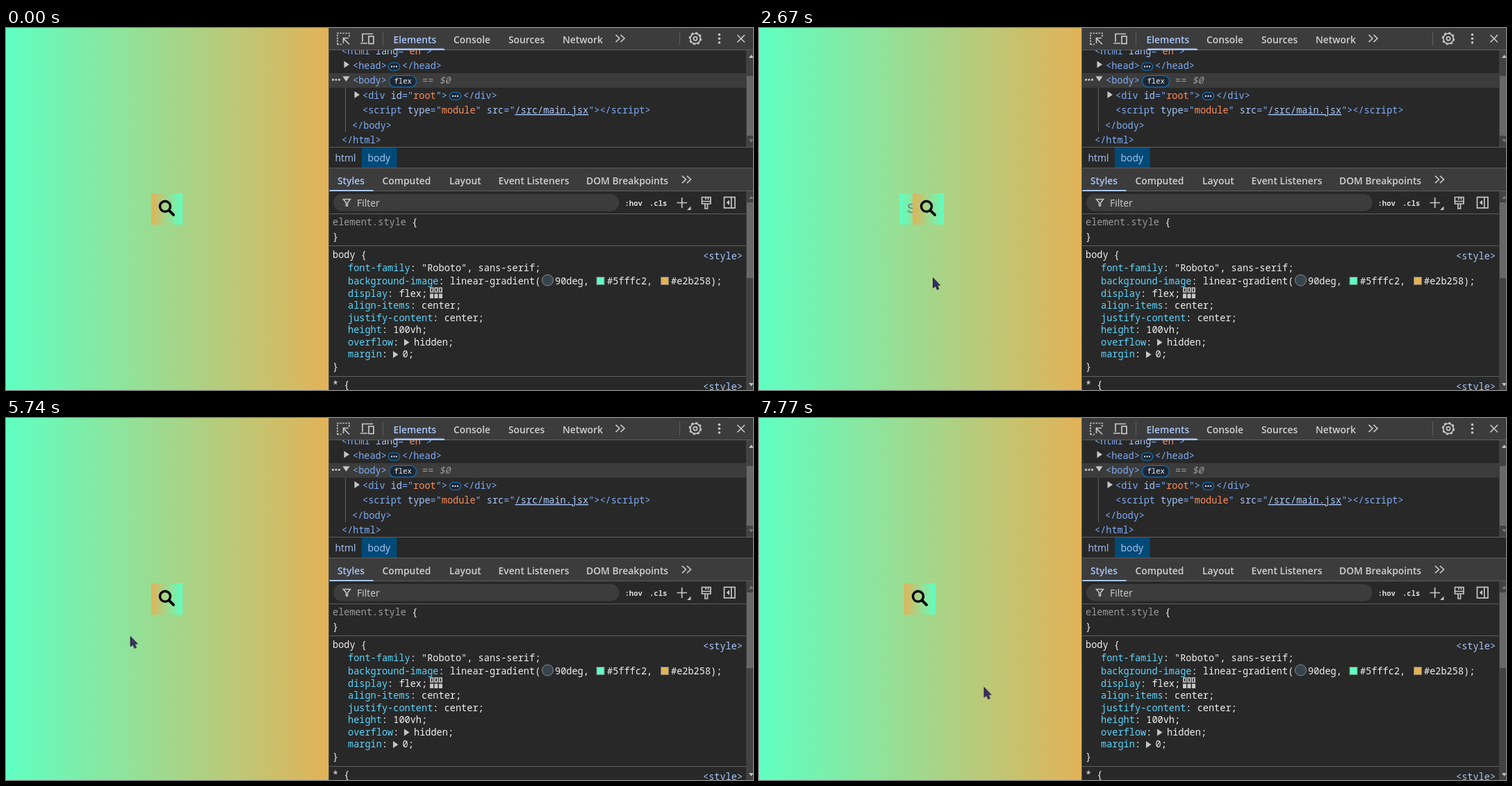
Animation, 1075 px wide and 521 px high, one loop 8000 ms. Source, as an HTML page:

```html
<!DOCTYPE html>
<html lang="en">
<head>
<meta charset="utf-8">
<title>Expanding search box</title>
<style>
@property --open { syntax: "<number>"; inherits: true; initial-value: 0; }

html, body { margin: 0; width: 100%; height: 100%; overflow: hidden; background: #282828; }
#stage { position: absolute; width: 1075px; height: 521px; overflow: hidden; --mint: #5fffc2; --sand: #e2b258; }
#stage > svg { position: absolute; left: 0; top: 0; }
.page { position: absolute; width: 464px; height: 521px; background: linear-gradient(90deg, var(--mint), var(--sand)); }

.search { animation: toggle 8s ease infinite; }
.field, .button { position: absolute; top: 238px; height: 44.5px; }
.field {
  left: calc(209px - 67.5px * var(--open));
  width: calc(44.5px + 135px * var(--open));
  overflow: hidden;
  background: linear-gradient(90deg, var(--mint), var(--sand));
  font: 18px/44px "Liberation Sans", Arial, sans-serif;
  color: #757575;
  text-indent: 11.5px;
  white-space: nowrap;
}
.button {
  left: calc(209px + 109px * var(--open));
  width: 44.5px;
  background: linear-gradient(90deg, var(--sand), var(--mint));
}
@keyframes toggle {
  0%, 13.275%, 35.85%, 45.75%, 70.25%, 77.06%, 96.5%, 100% { --open: 0; }
  19.525%, 29.6%, 52%, 64%, 83.31%, 90.25% { --open: 1; }
}

/* The pointer window shows one glyph of a strip: arrow, hand, text beam */
.pointer { position: absolute; left: -12px; top: -12px; width: 40px; height: 40px; overflow: hidden; animation: travel 8s linear infinite; }
.pointer svg { position: absolute; left: 0; top: 0; animation: glyph 8s step-end infinite; }
@keyframes travel {
  0%, 2.5% { transform: translate(336px, 495px); }
  6% { transform: translate(178px, 350px); }
  11%, 15.4% { transform: translate(229px, 275px); }
  19.5% { transform: translate(262px, 312px); }
  23% { transform: translate(310px, 308px); }
  27.5%, 29.6% { transform: translate(341px, 268px); }
  31.5% { transform: translate(300px, 325px); }
  33.375% { transform: translate(250px, 359px); }
  34.25% { transform: translate(248px, 361px); }
  41.875%, 46.25% { transform: translate(231px, 270px); }
  49% { transform: translate(262px, 330px); }
  53% { transform: translate(300px, 373px); }
  55.6% { transform: translate(325px, 372px); }
  56.5% { transform: translate(335px, 360px); }
  58.25% { transform: translate(351.5px, 301px); }
  60.5% { transform: translate(357px, 272px); }
  64% { transform: translate(345px, 268px); }
  65.9% { transform: translate(298px, 345px); }
  68.5% { transform: translate(250px, 386px); }
  70.5% { transform: translate(156px, 350px); }
  71.75% { transform: translate(178.5px, 314px); }
  75.25%, 77.75% { transform: translate(229px, 270px); }
  81.25% { transform: translate(270.5px, 302px); }
  84% { transform: translate(310px, 303px); }
  88%, 90.25% { transform: translate(343px, 270px); }
  97.125%, 100% { transform: translate(323.5px, 387px); }
}
@keyframes glyph {
  0% { transform: translateX(40px); }
  2.5%, 16.3%, 30.6%, 46.9%, 64.9%, 79.2%, 91.2%, 100% { transform: none; }
  10.6%, 26.5%, 41%, 59.8%, 74.6%, 87% { transform: translateX(-40px); }
  14.2%, 78% { transform: translateX(-80px); }
}

.code { font: 500 13.6px "Noto Sans Mono", "DejaVu Sans Mono", monospace; fill: #f0f0f0; }
.tree { font-size: 13.55px; }
.code .small { font-size: 10.6px; }
.code .strong { font-weight: 700; fill: #dcdcdc; }
.tag { fill: #7cacf8; }
.attr { fill: #a8c7fa; }
.value { fill: #fe8d59; }
.link { fill: #a8c7fa; text-decoration: underline; }
.prop { fill: #5cd5fb; }
.dim { fill: #9a9a9a; }
.ui { font: 14px "Open Sans", "Noto Sans", sans-serif; fill: #d0d0d0; }
.ui.tabs { font-weight: 600; font-size: 13.85px; }
.ui .active, .active { fill: #a8c7fa; }
.bar { fill: #3c3c3c; }
.rule { stroke: #5e5e5e; fill: none; }
.icon { stroke: #c7c7c7; stroke-width: 1.7; fill: none; }
.solid { fill: #c7c7c7; }
.pill { fill: #1d2733; stroke: #1279c4; stroke-width: 1.2; }
</style>
</head>
<body>
<div id="stage">
  <div class="page"></div>
  <div class="search">
    <div class="field">Search...</div>
    <div class="button">
      <svg width="44" height="44" fill="none" stroke="#000">
        <circle cx="20" cy="18.8" r="7.5" stroke-width="3.4"/>
        <path d="M25.5 24.3L32 30.8" stroke-width="4" stroke-linecap="round"/>
      </svg>
    </div>
  </div>

  <svg width="1075" height="521">
    <defs>
      <g id="more">
        <rect class="pill" x="-8.2" y="-5.5" width="16.4" height="11" rx="5.5"/>
        <path d="M-4.5 0h2m1.5 0h2m1.5 0h2" stroke="#d0e2ff" stroke-width="2"/>
      </g>
      <path id="closed" class="solid" d="M0 0l7.5 5l-7.5 5z"/>
      <path id="chevrons" class="icon" d="M0 0l5.5 5.2l-5.5 5.2M7 0l5.5 5.2l-5.5 5.2"/>
    </defs>
    <rect x="464" width="611" height="521" fill="#282828"/>

    <!-- Element tree -->
    <rect class="bar" x="465" y="65" width="600" height="21"/>
    <path class="rule" d="M488.5 86V150"/>
    <g class="code tree">
      <text x="483" y="38"><tspan class="tag">&lt;html </tspan><tspan class="attr">lang</tspan><tspan class="tag">="</tspan><tspan class="value">en</tspan><tspan class="tag">"&gt;</tspan></text>
      <g class="tag">
        <text x="499" y="59">&lt;head&gt;</text>
        <text x="570" y="59">&lt;/head&gt;</text>
        <text x="499" y="80">&lt;body&gt;</text>
        <text x="513" y="102">&lt;div <tspan class="attr">id</tspan>="<tspan class="value">root</tspan>"&gt;</text>
        <text x="658" y="102">&lt;/div&gt;</text>
        <text x="513" y="123">&lt;script <tspan class="attr">type</tspan>="<tspan class="value">module</tspan>" <tspan class="attr">src</tspan>="<tspan class="link">/src/main.jsx</tspan>"&gt;&lt;/script&gt;</text>
        <text x="498" y="145">&lt;/body&gt;</text>
        <text x="483" y="166">&lt;/html&gt;</text>
      </g>
      <rect class="pill" x="551.5" y="68.5" width="39" height="16.5" rx="8.2"/>
      <text class="small" x="558.5" y="80">flex</text>
      <text class="dim" x="599" y="80">== <tspan font-style="italic">$0</tspan></text>
    </g>
    <use href="#more" x="558.5" y="55.5"/>
    <use href="#more" x="646.5" y="98"/>
    <use href="#closed" x="486.5" y="47.5"/>
    <use href="#closed" x="501.5" y="91"/>
    <path class="solid" d="M484.5 69.5h10l-5 7.5z"/>
    <path d="M469 74.5h3m1.5 0h3m1.5 0h3" stroke="#c7c7c7" stroke-width="2.6"/>

    <!-- Main toolbar -->
    <rect class="bar" x="465" width="610" height="31"/>
    <path class="rule" d="M465 31.5H1075M542.5 5V25M969.5 5V25"/>
    <path class="active" d="M558 32a2.5 2.5 0 0 1 2.5-2.5H629a2.5 2.5 0 0 1 2.5 2.5z"/>
    <g class="ui tabs">
      <text class="active" x="557.5" y="22">Elements</text>
      <text x="644" y="22">Console</text>
      <text x="723" y="22">Sources</text>
      <text x="801" y="22">Network</text>
    </g>
    <g class="icon">
      <path d="M477 24V7.5H494V13M477 23.5H483" stroke-dasharray="2.4 1.6"/>
      <path d="M494 23.5L485.5 15M485.5 22V14.5H493"/>
      <path d="M513 20V8.5H528M510 22H520"/>
      <rect x="522" y="12" width="7" height="10.5"/>
      <circle cx="992" cy="15.2" r="7.2"/>
      <circle cx="992" cy="15.2" r="8.3" stroke-dasharray="3.2 3.32" stroke-width="2"/>
      <circle cx="992" cy="15.2" r="2.6"/>
      <path d="M1052.5 10L1063 20.5M1063 10L1052.5 20.5"/>
    </g>
    <use href="#chevrons" x="877.5" y="9.8"/>
    <g class="solid"><circle cx="1026.5" cy="9.5" r="1.8"/><circle cx="1026.5" cy="15.3" r="1.8"/><circle cx="1026.5" cy="21" r="1.8"/></g>

    <!-- Breadcrumbs -->
    <rect x="465" y="172" width="610" height="29" fill="#282828"/>
    <rect x="512" y="172" width="50.5" height="29" fill="#004a77"/>
    <g class="ui">
      <text class="active" x="473.5" y="192">html</text>
      <text class="active" x="520.5" y="192">body</text>
    </g>

    <!-- Style tabs and filter -->
    <rect class="bar" x="465" y="202" width="610" height="32"/>
    <path class="rule" d="M465 171.5H1075M465 201.5H1075M465 234.5H1075M465 267.5H1075"/>
    <path class="active" d="M465 235a2 2 0 0 1 2-2H527a2 2 0 0 1 2 2z"/>
    <g class="ui tabs">
      <text class="active" x="477" y="225">Styles</text>
      <text x="541.5" y="225">Computed</text>
      <text x="638" y="225">Layout</text>
      <text x="708.5" y="225">Event Listeners</text>
      <text x="835" y="225">DOM Breakpoints</text>
    </g>
    <use href="#chevrons" x="973" y="212.8"/>
    <rect class="bar" x="471" y="239" width="411.5" height="24.5" rx="12.2"/>
    <text class="ui" x="505" y="257">Filter</text>
    <g class="code">
      <text class="small strong" x="890.5" y="256">:hov</text>
      <text class="small strong" x="926" y="256">.cls</text>
    </g>
    <g class="icon">
      <path d="M485.5 246.5H495.5L491.5 251.5V256H489.5V251.5Z" stroke-width="1.5"/>
      <path d="M965.5 251.5H980M972.7 244V259"/>
      <path d="M1001.5 243.5H1014V253H1001.5ZM1001.5 249.5H1014M1007 243.5V247M1010.5 243.5V247M1006 253V260H1009.5V253"/>
      <rect x="1033.5" y="243.5" width="15.5" height="15.5"/>
      <path d="M1043.8 243.5V259"/>
    </g>
    <path class="solid" d="M985.5 256.5V262H980zM1041 247.5V255L1036.8 251.2z"/>

    <!-- Rules -->
    <path class="rule" d="M465 313.5H1065M465 501.5H1065"/>
    <g class="code">
      <text x="470" y="284"><tspan class="dim">element.style</tspan> {</text>
      <text x="470" y="305">}</text>
      <text x="470" y="331">body {</text>
      <text class="attr" x="1003" y="333">&lt;style&gt;</text>
      <text x="492" y="350"><tspan class="prop">font-family</tspan>: "Roboto", sans-serif;</text>
      <text x="492" y="369"><tspan class="prop">background-image</tspan>: linear-gradient(</text>
      <text x="790" y="369">90deg,</text>
      <text x="865" y="369">#5fffc2,</text>
      <text x="957" y="369">#e2b258);</text>
      <text x="492" y="387"><tspan class="prop">display</tspan>: flex;</text>
      <text x="492" y="404"><tspan class="prop">align-items</tspan>: center;</text>
      <text x="492" y="422"><tspan class="prop">justify-content</tspan>: center;</text>
      <text x="492" y="439"><tspan class="prop">height</tspan>: 100vh;</text>
      <text x="492" y="457"><tspan class="prop">overflow</tspan>:</text>
      <text x="587" y="457">hidden;</text>
      <text x="492" y="474"><tspan class="prop">margin</tspan>:</text>
      <text x="570.5" y="474">0;</text>
      <text x="470" y="492">}</text>
      <text x="470" y="518">* {</text>
      <text class="attr" x="1003" y="521">&lt;style&gt;</text>
    </g>
    <circle cx="779.5" cy="363" r="8" fill="#36454d" stroke="#8a8a8a"/>
    <rect x="850" y="358.5" width="11" height="11" fill="#5fffc2" stroke="#777"/>
    <rect x="942.5" y="358.5" width="11" height="11" fill="#e2b258" stroke="#777"/>
    <path class="icon" d="M611 374h3.5v6h-3.5zM617.3 374h3.5v6h-3.5zM623.6 374h3.5v6h-3.5z"/>
    <path class="solid" d="M610 382.5h5v6.5h-5zM616.5 382.5h5v6.5h-5zM623 382.5h5v6.5h-5z"/>
    <use href="#closed" x="573" y="447.5"/>
    <use href="#closed" x="557" y="465"/>

    <!-- Scrollbars and divider -->
    <path fill="#424242" d="M1065 32h10v139h-10zM1065 235h10v286h-10z"/>
    <path fill="#686868" d="M1066 69h9v86h-9zM1066 251h9v109h-9z"/>
    <path class="solid" d="M1069 43l3.5-4.5l3.5 4.5zM1069 511l3.5 4.5l3.5-4.5z"/>
    <path fill="#777" d="M1069 160l3.5 4.5l3.5-4.5zM1069 246l3.5-4.5l3.5 4.5z"/>
    <path class="rule" d="M464.5 0V521"/>
  </svg>

  <div class="pointer">
    <svg width="120" height="40" fill="#3a2d6a" stroke="#2a2638">
      <path d="M12.5 12.5V27L16 24.2L18.4 29.6L20.8 28.5L18.5 23.2H22.5Z"/>
      <path d="M51 25V13.5Q52.3 11.5 53.6 13.5V19Q56 18 56.5 19.5Q59 18.8 59.4 20.5Q62 20 62 22V26Q62 31 56 31Q52 31 50 28L46.5 23.5Q48 21.5 51 25Z"/>
      <path d="M88.5 5.5H91L92 6.5L93 5.5H95.5M92 6.5V18.5M88.5 19.5H91L92 18.5L93 19.5H95.5" fill="none" stroke-width="1.8"/>
    </svg>
  </div>
</div>
</body>
</html>
```
